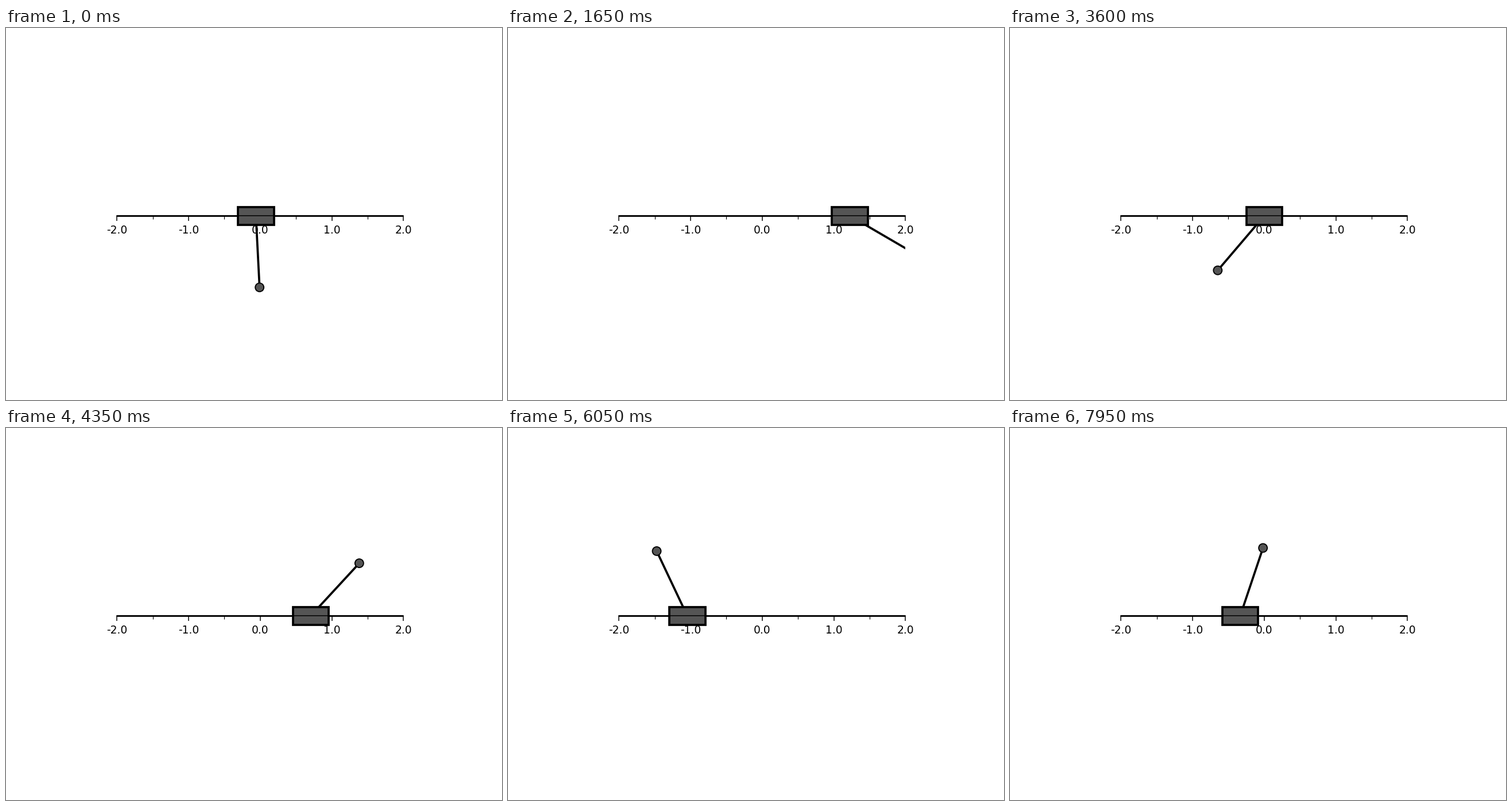
Recreate the animation shown at these times as a matplotlib script. Size 864 px wide and 648 px high, loop 8 s.

```python
import numpy as np
import matplotlib.pyplot as plt
from matplotlib.animation import FuncAnimation
from matplotlib.patches import Circle, Rectangle
from matplotlib.ticker import FormatStrFormatter, MultipleLocator

FRAMES, DT, G = 160, 0.05, 9.8
GREY = "#555555"

# key poses: time, cart position, rod angle from straight down
FIRM = [(0, -0.06, 0.051), (0.85, 1.395, -0.369), (2.4, 0.094, -0.63),
        (3.6, 0, -0.706), (4.35, 0.705, 2.396), (6.05, -1.046, 3.583),
        (7.95, -0.335, 9.101)]
LOOSE = [(1.7, 1.077, 1.1), (2.55, 0.104, -1.29), (2.95, 0.1, -2.02),
         (3.4, -0.647, -1.271), (4.25, 1.06, 2.25), (5.1, -0.64, 2.95),
         (5.95, -1.007, 3.46), (6.8, -0.199, 6.283), (7.15, 0.8, 7.95),
         (7.65, -0.094, 8.941)]


def solve_motion():
    """Smoothest cart path through the poses that obeys the pendulum law."""
    n = FRAMES
    eye = np.eye(n)
    acc = np.diff(eye, 2, axis=0) / DT**2
    jerk = np.diff(eye, 3, axis=0) / DT**3
    start = np.diff(eye[:2], axis=0) / DT
    both = np.eye(2)  # np.kron(both, m) applies m to position and angle

    # linear terms: poses, gentle cart force, start at rest
    rows, goals = [], []
    for poses, weight in ((FIRM, 1000), (LOOSE, 60)):
        t, x, a = np.transpose(poses)
        rows.append(weight * np.kron(both, eye[np.rint(t / DT).astype(int)]))
        goals.append(weight * np.concatenate([x, a]))
    rows += [np.kron([[1, 0]], 0.005 * jerk), np.kron([[1, 0]], 0.02 * acc),
             np.kron(both, 3 * start)]
    lin = np.vstack(rows)
    goal = np.concatenate(goals)
    goal = np.pad(goal, (0, len(lin) - len(goal)))

    def terms(z):
        x, a = z[:n], z[n:]
        mid, push = a[1:-1], acc @ x
        law = acc @ a + G * np.sin(mid) + np.cos(mid) * push
        slope_x = np.cos(mid)[:, None] * acc
        slope_a = acc + (G * np.cos(mid) - np.sin(mid) * push)[:, None] * eye[1:-1]
        return (np.concatenate([2 * law, lin @ z - goal]),
                np.vstack([2 * np.hstack([slope_x, slope_a]), lin]))

    t, x, a = np.transpose(sorted(FIRM + LOOSE))
    times = np.arange(n) * DT
    z = np.concatenate([np.interp(times, t, x), np.interp(times, t, a)])
    res, jac = terms(z)
    damp = 100.0
    for _ in range(120):
        step = np.linalg.solve(jac.T @ jac + damp * np.eye(2 * n), -jac.T @ res)
        new_res, new_jac = terms(z + step)
        if new_res @ new_res < res @ res:
            z, res, jac = z + step, new_res, new_jac
            damp = max(damp * 0.4, 1e-5)
            if np.abs(step).max() < 1e-6:
                break
        else:
            damp *= 4
    return z[:n], z[n:]


cart_x, angle = solve_motion()

fig = plt.figure(figsize=(6.4, 4.8), dpi=135, facecolor="white")
ax = fig.add_axes([0.125, 0.11, 0.775, 0.77])
ax.set(xlim=(-2, 2), ylim=(-2, 2), aspect="equal")
ax.patch.set_alpha(0)
ax.set_axisbelow(True)
for side in ("left", "right", "top"):
    ax.spines[side].set_visible(False)
ax.spines["bottom"].set_position("zero")
ax.yaxis.set_visible(False)
ax.xaxis.set_major_locator(MultipleLocator(1))
ax.xaxis.set_minor_locator(MultipleLocator(0.5))
ax.xaxis.set_major_formatter(FormatStrFormatter("%1.1f"))
ax.tick_params(axis="x", which="major", width=0.8, length=5, pad=3.5)
ax.tick_params(axis="x", which="minor", width=0.6, length=3)

ax.axhline(0, color="black", lw=1.5, zorder=0.8)
rod, = ax.plot([], [], color="black", lw=2, zorder=1)
cart = Rectangle((0, -0.125), 0.5, 0.25, fc=GREY, ec="black", lw=2, zorder=1.1)
bob = Circle((0, -1), 0.06, fc=GREY, ec="black", lw=1, zorder=1.2)
ax.add_patch(cart)
ax.add_patch(bob)


def draw(i):
    x, a = cart_x[i], angle[i]
    tip = x + np.sin(a), -np.cos(a)
    cart.set_x(x - 0.25)
    rod.set_data([x, tip[0]], [0, tip[1]])
    bob.center = tip
    return rod, cart, bob


anim = FuncAnimation(fig, draw, frames=FRAMES, interval=50, repeat=True,
                     repeat_delay=0, blit=False)
plt.show()
```
